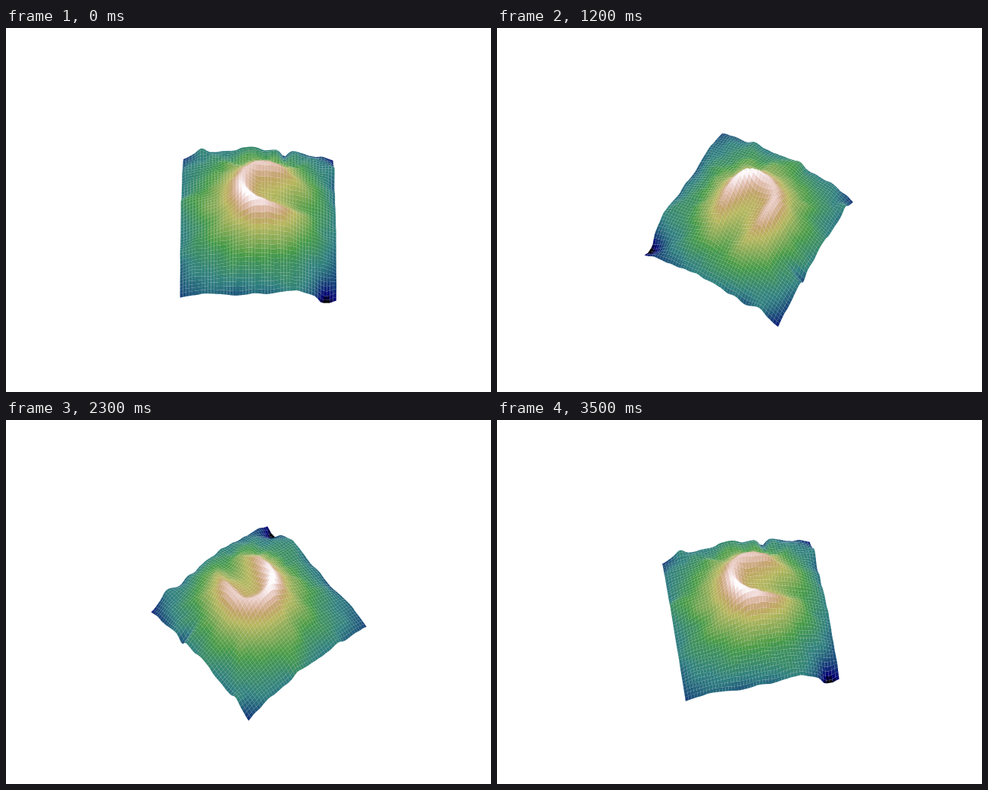
Recreate the animation shown at these times as a matplotlib script. Size 640 px wide and 480 px high, loop 3.6 s.

```python
import numpy as np
import matplotlib.pyplot as plt
from matplotlib.animation import FuncAnimation

FRAMES = 36
CELLS = 50
rng = np.random.default_rng(7)

axis = np.linspace(-0.5, 0.5, CELLS + 1)
X, Y = np.meshgrid(axis, axis)


def smooth(a, passes):
    for _ in range(passes):
        p = np.pad(a, 1, mode="edge")
        a = (p[:-2, 1:-1] + p[2:, 1:-1] + p[1:-1, :-2] + p[1:-1, 2:] + 2 * a) / 6
    return a


def noise(passes, size):
    a = smooth(rng.normal(size=X.shape), passes)
    return a * size / a.std()


def bump(x, y, sx, sy, height):
    return height * np.exp(-((X - x) / sx) ** 2 - ((Y - y) / sy) ** 2)


def cone():
    dx, dy = X - 0.045, Y - 0.03
    r = np.hypot(dx, dy)
    theta = np.arctan2(dy, dx)
    west = 0.08 * np.maximum(-np.cos(theta), 0) - 0.02
    ridges = 0.011 * np.sin(13 * theta + 9 * r) + 0.008 * np.sin(23 * theta)
    flank = np.clip((r - 0.1) / 0.1, 0, 1)
    return 0.22 + 0.73 * np.exp((0.15 - r) / 0.2) + west + ridges * flank


def crater():
    """Valley that starts inside the rim and opens to the east."""
    c, s = np.cos(-0.18), np.sin(-0.18)
    dx, dy = X - 0.03, Y - 0.05
    along, across = dx * c + dy * s, dy * c - dx * s
    d = np.hypot(across, np.minimum(along, 0))
    floor = 0.73 - 0.8 * np.maximum(along, 0)
    return floor + 0.27 * (d / 0.138) ** 2


def terrain():
    h = smooth(np.minimum(cone(), crater()), 1)
    for side in (X, Y):
        h -= 0.09 * np.exp((np.abs(side) - 0.5) / 0.08)
    h += bump(0.43, -0.5, 0.05, 0.1, -0.17)    # sink hole
    h += bump(0.17, 0.48, 0.03, 0.12, -0.11)   # ravine
    h += bump(0.2, -0.5, 0.12, 0.1, 0.08)      # shoulders along the border
    h += bump(0, 0.5, 0.15, 0.1, 0.05)
    h += bump(-0.38, 0.5, 0.04, 0.06, 0.08)
    h += bump(-0.5, 0.1, 0.1, 0.06, 0.08)
    h += bump(0.5, 0.37, 0.06, 0.06, 0.07)
    h += noise(8, 0.011) + noise(2, 0.007)
    return np.clip(h / h.max(), 0, 1)


Z = terrain()

fig = plt.figure(figsize=(6.4, 4.8), dpi=100, facecolor="white")
ax = fig.add_subplot(projection="3d")
ax.plot_surface(X, Y, Z, rstride=1, cstride=1, cmap="gist_earth",
                vmin=0.005, vmax=0.975, linewidth=0)
ax.set(xlim=(-0.573, 0.573), ylim=(-0.573, 0.573), zlim=(-0.073, 1.073))
ax.set_axis_off()


def update(i):
    ax.view_init(elev=65, azim=10 * i - 90)
    return ()


anim = FuncAnimation(fig, update, frames=FRAMES, interval=100,
                     repeat=True, repeat_delay=0)
plt.show()
```
